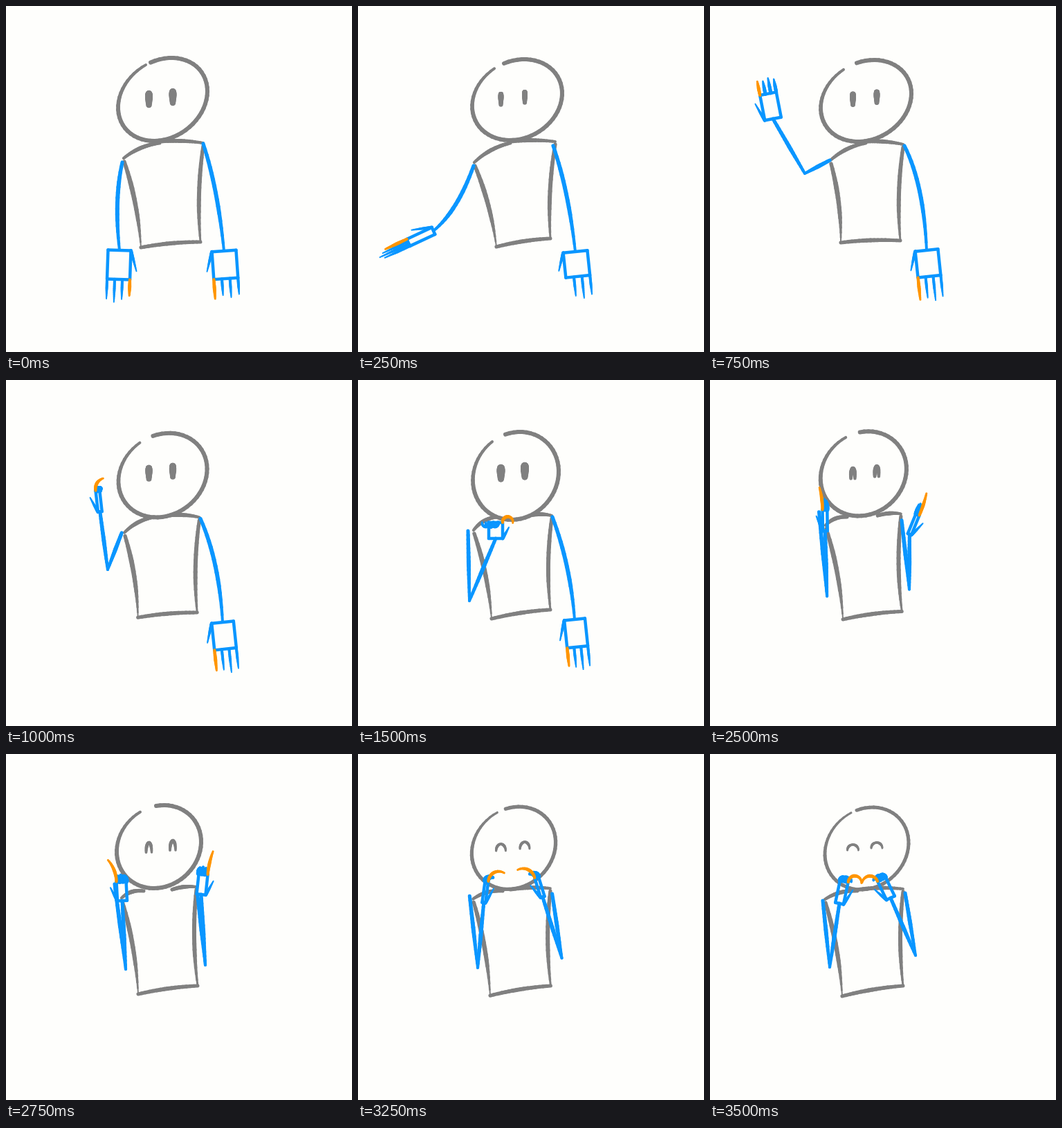
Write an HTML page with a canvas that moves like this. It is 500 by 500 pixels and loops after 3.75 s.

```html
<!DOCTYPE html>
<html lang="en">
<head>
<meta charset="utf-8">
<title>Signing figure</title>
<style>
html, body { margin: 0; width: 100%; height: 100%; overflow: hidden; background: #fefefc; }
canvas { display: block; }
</style>
</head>
<body>
<canvas id="stage" width="500" height="500"></canvas>
<script>
const ctx = document.getElementById('stage').getContext('2d');
const STEP = 250, STEPS = 15;
const GREY = '#808080', BLUE = '#0a96ff', ORANGE = '#ff9500';

const { PI, sin, cos, acos, abs, hypot, max, min } = Math;
const rad = degrees => degrees * PI / 180;
const mix = (a, b, t) => a + (b - a) * t;
const sample = (count, point) => Array.from({ length: count + 1 }, (_, i) => point(i / count));

// Mixes numbers, arrays and objects of the same shape
function tween(a, b, t) {
  if (typeof a === 'number') return mix(a, b, t);
  if (Array.isArray(a)) return a.map((v, i) => tween(v, b[i], t));
  return Object.fromEntries(Object.keys(a).map(key => [key, tween(a[key], b[key], t)]));
}

// Quadratic curve from a to b that passes through m halfway
function through(a, m, b) {
  return sample(16, t => [0, 1].map(c =>
    mix(a[c], b[c], t) + (m[c] - (a[c] + b[c]) / 2) * 4 * t * (1 - t)));
}

function bowed(a, b, bow = 0) {
  const dx = b[0] - a[0], dy = b[1] - a[1], k = bow / hypot(dx, dy);
  return through(a, [(a[0] + b[0]) / 2 + dy * k, (a[1] + b[1]) / 2 - dx * k], b);
}

// Brush stroke whose widths are spread along its length
function brush(color, widths, pts) {
  ctx.strokeStyle = color;
  ctx.lineCap = 'round';
  for (let i = 1; i < pts.length; i++) {
    const x = i / (pts.length - 1) * (widths.length - 1), k = Math.floor(x);
    ctx.lineWidth = mix(widths[k], widths[k + 1] ?? widths[k], x - k);
    ctx.beginPath();
    ctx.moveTo(...pts[i - 1]);
    ctx.lineTo(...pts[i]);
    ctx.stroke();
  }
}

// Leaning ellipse inside the box, left open at the top between two x positions
function drawHead({ box: [left, top, right, bottom], lean, opening, weight }) {
  const cx = (left + right) / 2, cy = (top + bottom) / 2;
  const rx = (right - left) / 2, ry = (bottom - top) / 2;
  const [from, to] = opening.map(x => -acos((x - cx) / rx));
  const outline = sample(60, t => {
    const a = mix(from, to + 2 * PI, t);
    return [cx + rx * cos(a), cy + ry * sin(a - lean)];
  });
  brush(GREY, [weight, weight, weight, weight, weight, weight - 2], outline);
}

// Arches that close up to solid ovals when they have no spread
function drawEyes([spread, height, weight]) {
  for (const [x, y] of [[206.5, 135], [241, 132]]) {
    brush(GREY, [weight * 0.7, weight, weight * 0.85, weight, weight * 0.7], sample(16, t =>
      [x - spread * cos(PI * t), y + height * (0.5 - sin(PI * t))]));
  }
}

function drawTorso([leftTop, rightTop, leftHip, rightHip], neck) {
  brush(GREY, [4, 6, 5], bowed(leftTop, [neck[0], 198], 4));
  brush(GREY, [5, 6, 4], bowed([neck[1], 196], rightTop, 2));
  brush(GREY, [5, 7, 6, 2], bowed([leftTop[0] + 1, leftTop[1] + 5], leftHip, 4));
  brush(GREY, [5, 6, 6, 3], bowed([rightTop[0], rightTop[1] + 4], rightHip, -4));
  brush(GREY, [5, 6, 5], bowed(leftHip, rightHip, 2));
}

// The sign of the width tells on which side the thumb and index finger lie
function drawHand({ wrist, angle, width, palm, finger, index, curl }) {
  const a = rad(angle), side = width < 0 ? -1 : 1;
  const at = (across, along) => [
    wrist[0] + along * cos(a) - across * sin(a),
    wrist[1] + along * sin(a) + across * cos(a)];
  const digit = (across, length) => {
    let [x, y] = at(across, palm);
    return sample(12, t => {
      const heading = a + rad(curl) * t, point = [x, y];
      x += length / 12 * cos(heading);
      y += length / 12 * sin(heading);
      return point;
    });
  };
  const half = width / 2;
  brush(BLUE, [4.5, 4.5], [at(-half, 0), at(half, 0), at(half, palm), at(-half, palm), at(-half, 0)]);
  brush(BLUE, [5, 4, 2], through(at(half, 0), at(half + side * 4, palm * 0.3), at(half + side * 9, palm * 0.7)));
  const weight = max(4, min(8, 10 - abs(finger) / 4));
  for (let i = 1; i < 4; i++) {
    const length = finger * (1.1 - 0.15 * abs(i - 2));
    brush(BLUE, [weight, weight, weight / 2], digit(half - i * width / 3, length));
  }
  if (index) brush(ORANGE, [4, 5, 3], digit(half, index));
}

// A nearly straight arm is one smooth curve; a bent one has a sharp elbow
function drawArm(arm) {
  const { shoulder, elbow, wrist } = arm;
  const [ux, uy, fx, fy] = [elbow[0] - shoulder[0], elbow[1] - shoulder[1], wrist[0] - elbow[0], wrist[1] - elbow[1]];
  if (ux * fx + uy * fy > 0.85 * hypot(ux, uy) * hypot(fx, fy)) {
    brush(BLUE, [5, 6, 6, 4], through(shoulder, elbow, wrist));
  } else {
    brush(BLUE, [5, 6, 4], bowed(shoulder, elbow));
    brush(BLUE, [4, 6, 5], bowed(elbow, wrist));
  }
  drawHand(arm);
}

const head = (box, lean, opening, weight = 6) => ({ box, lean, opening, weight });
const arm = (shoulder, elbow, wrist, angle, width, palm, finger, index, curl = 0) =>
  ({ shoulder, elbow, wrist, angle, width, palm, finger, index, curl });

// Eyes: spread, height, weight. Torso: shoulders, then hips.
const keys = [
  { step: 0, head: head([162, 75, 291, 195], 0.2, [209, 202]), eyes: [0, 16, 11], neck: [222, 222],
    torso: [[170, 220], [285, 198], [195, 349], [281, 341]],
    left: arm([168, 226], [161, 285], [164, 353], 92, -33, 42, 30, 23),
    right: arm([285, 199], [303, 270], [315, 354], 86, 35, 40, 25, 28) },
  { step: 1, head: head([165, 77, 295, 194], 0.16, [211, 197]), eyes: [0, 15, 8], neck: [220, 220],
    torso: [[168, 226], [285, 196], [200, 348], [278, 336]],
    left: arm([167, 231], [141, 287], [109, 325], 155, 11, 40, 42, 34),
    right: arm([282, 202], [301, 272], [314, 355], 84, 35, 36, 29, 0) },
  { step: 3, head: head([160, 78, 291, 196], 0.18, [212, 193]), eyes: [0, 15, 9], neck: [225, 225],
    torso: [[174, 223], [279, 200], [189, 342], [275, 339]],
    left: arm([173, 223], [137, 242], [91, 163], 259, -24, 37, 20, 20),
    right: arm([281, 202], [303, 268], [313, 353], 84, 33, 38, 32, 32) },
  { step: 6, head: head([166, 75, 290, 202], 0.1, [213, 194]), eyes: [0, 16, 12], neck: [200, 248],
    torso: [[167, 217], [280, 196], [193, 345], [278, 332]],
    left: arm([159, 218], [161, 319], [199, 229], 270, 20, 23, -18, 26, 200),
    right: arm([281, 198], [302, 270], [313, 346], 84, 30, 40, 30, 26) },
  { step: 8, head: head([159, 75, 289, 203], 0.1, [216, 202]), eyes: [0, 16, 10], neck: [196, 248],
    torso: [[167, 215], [278, 197], [195, 343], [278, 333]],
    left: arm([159, 198], [159, 316], [162, 234], 275, 12, 38, 28, 28, 50),
    right: arm([277, 197], [288, 296], [305, 275], -25, -14, 34, 28, 30, -75) },
  { step: 11, head: head([160, 74, 282, 194], 0.12, [217, 194]), eyes: [4, 14, 5], neck: [199, 240],
    torso: [[167, 208], [275, 192], [191, 347], [277, 335]],
    left: arm([157, 188], [173, 311], [168, 212], 267, -14, 28, 9, 34, -40),
    right: arm([277, 205], [288, 305], [282, 203], -84, 13, 30, 9, 34, 15) },
  { step: 14, head: head([166, 77, 287, 196], 0.14, [212, 204], 5), eyes: [8, 8, 4], neck: [213, 213],
    torso: [[166, 210], [279, 195], [191, 350], [279, 335]],
    left: arm([163, 212], [173, 308], [187, 216], 282, 12, 33, 14, 30, 180),
    right: arm([282, 201], [297, 291], [261, 208], -116, -13, 30, 14, 30, -150) }
];

function poseAt(step) {
  const next = keys.findIndex(key => key.step >= step);
  if (keys[next].step === step) return keys[next];
  const a = keys[next - 1], b = keys[next];
  return tween(a, b, ((step - a.step) / (b.step - a.step)) ** 0.8);
}

function draw(pose) {
  ctx.fillStyle = '#fefefc';
  ctx.fillRect(0, 0, 500, 500);
  drawHead(pose.head);
  drawEyes(pose.eyes);
  drawTorso(pose.torso, pose.neck);
  drawArm(pose.left);
  drawArm(pose.right);
}

const start = performance.now();
function tick() {
  draw(poseAt(Math.floor((performance.now() - start) / STEP) % STEPS));
  requestAnimationFrame(tick);
}
tick();
</script>
</body>
</html>
```
